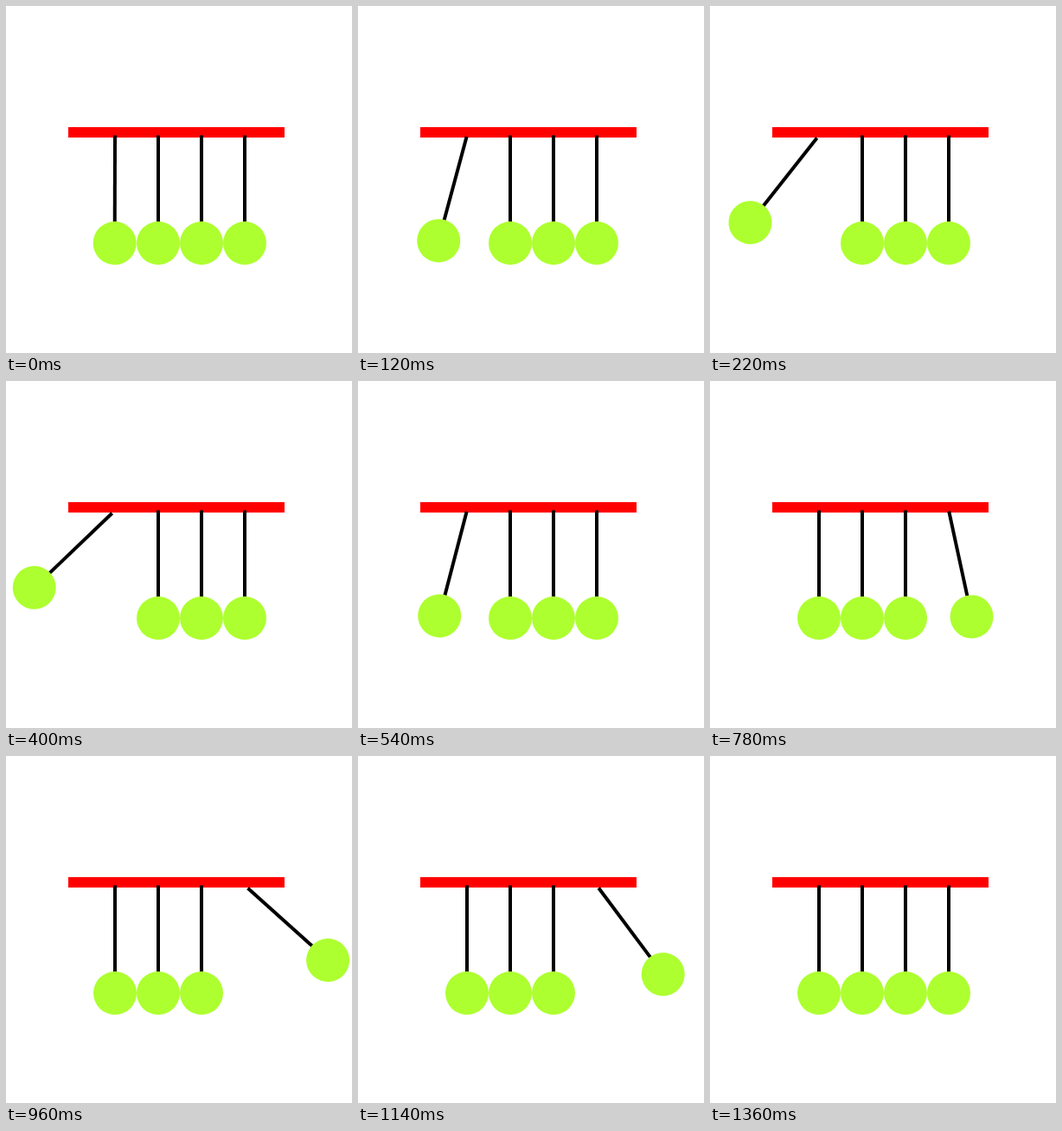
An HTML page that plays this animation: 400x401 px, repeating every 1380 ms.

```html
<!DOCTYPE html>
<html lang="en">
<head>
<meta charset="utf-8">
<title>Newton's cradle</title>
<style>
  html, body { margin: 0; width: 100%; height: 100%; overflow: hidden; background: #fff; }
  svg { display: block; width: 100vw; height: 100vh; }
</style>
</head>
<body>
<svg viewBox="0 0 400 401">
  <defs>
    <g id="pendulum">
      <rect x="-2" width="4" height="100"/>
      <circle cy="124.5" r="25" fill="#adff2f"/>
    </g>
  </defs>
  <rect x="72" y="140" width="250" height="12" fill="#f00"/>
  <use id="left" href="#pendulum"/>
  <use href="#pendulum" transform="translate(176 149.5)"/>
  <use href="#pendulum" transform="translate(226 149.5)"/>
  <use id="right" href="#pendulum"/>
</svg>
<script>
const LOOP = 1380, STEP = 20, MAX_ANGLE = 50, STRETCH = 5;
// [time in ms, swing]: -1 is fully left, 1 is fully right
const keys = [[-14, 0], [338, -1], [661, 0], [1009, 1], [1018, 1], [1360, 0], [LOOP, 0]];
const left = document.getElementById('left');
const right = document.getElementById('right');

// cubic-bezier(.42, 0, .58, 1), solved for x by bisection
function easeInOut(x) {
  let lo = 0, hi = 1;
  for (let i = 0; i < 24; i++) {
    const s = (lo + hi) / 2, r = 1 - s;
    if (1.26 * s * r * r + 1.74 * s * s * r + s ** 3 < x) lo = s;
    else hi = s;
  }
  return lo * lo * (3 - 2 * lo);
}

function swingAt(t) {
  const i = keys.findIndex(([end]) => t < end);
  const [t0, a] = keys[i - 1], [t1, b] = keys[i];
  return a + (b - a) * easeInOut((t - t0) / (t1 - t0));
}

function pose(ball, x, swing) {
  ball.setAttribute('transform',
    `translate(${x} 149.5) rotate(${-MAX_ANGLE * swing}) translate(0 ${STRETCH * Math.abs(swing)})`);
}

const start = performance.now();
function draw() {
  const t = (performance.now() - start) % LOOP;
  const swing = swingAt(Math.floor(t / STEP) * STEP);
  pose(left, 126, Math.min(swing, 0));
  pose(right, 276, Math.max(swing, 0));
  requestAnimationFrame(draw);
}
draw();
</script>
</body>
</html>
```
